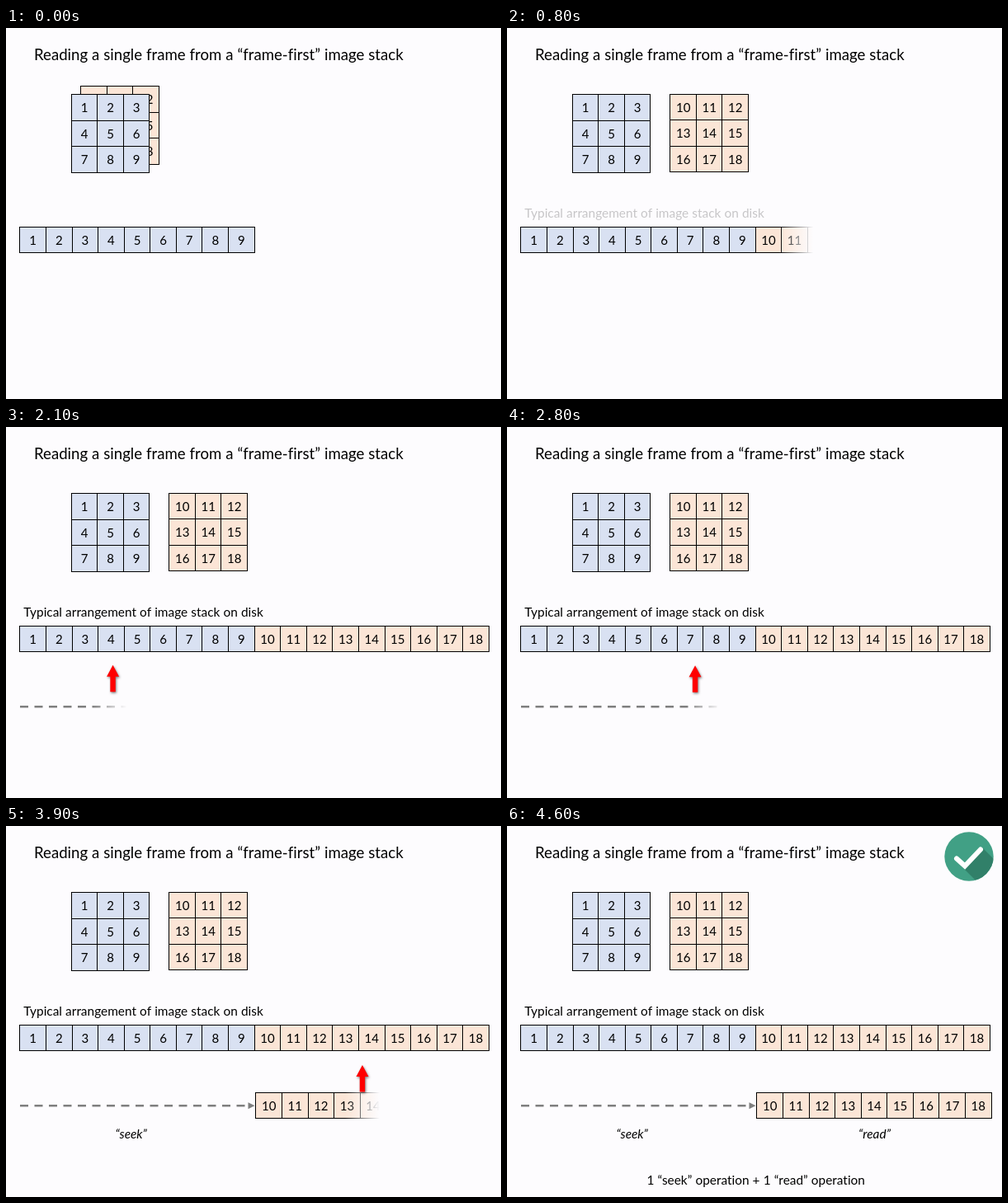
Recreate the animation shown at these times as an HTML page with a canvas. Size 600 by 450 pixels, loop 4.7 s.

```html
<!DOCTYPE html>
<html lang="en">
<head>
<meta charset="utf-8">
<title>Reading a frame from an image stack</title>
<style>
html, body { margin: 0; width: 100%; height: 100%; overflow: hidden; background: #fdfcfe; }
canvas { display: block; }
</style>
</head>
<body>
<canvas id="stage" width="600" height="450"></canvas>
<script>
const ctx = document.getElementById('stage').getContext('2d');
const LOOP = 4700, STEP = 100;
const BG = '#fdfcfe', CLEAR = 'rgba(253,252,254,0)';
const BLUE = '#d9e1f2', ORANGE = '#fbe5d6', GRAY = '#7f7f7f';
const CELL = 31.5, SLOT = 31.58, ROW = SLOT * 9, SOFT = 42;

const progress = (t, from, to) => Math.min(1, Math.max(0, (t - from) / (to - from)));
const snap = v => Math.floor(v) + 0.5;

function text(str, x, y, size, { align = 'left', style = '', alpha = 1 } = {}) {
  ctx.globalAlpha = alpha;
  ctx.font = `${style} ${size}px Lato, Carlito, sans-serif`;
  ctx.wordSpacing = size * 0.01 + 'px';
  ctx.letterSpacing = '0.01px'; // any spacing turns ligatures off
  ctx.textAlign = align;
  ctx.fillStyle = '#000';
  ctx.fillText(str, x, y);
  ctx.globalAlpha = 1;
}

function cells(x, y, cols, rows, w, first, color) {
  ctx.strokeStyle = '#000';
  ctx.lineWidth = 1;
  ctx.fillStyle = color;
  for (let i = 0; i < cols * rows; i++) {
    const cx = x + (i % cols) * w, cy = y + Math.floor(i / cols) * CELL;
    const left = snap(cx), top = snap(cy);
    const box = [left, top, snap(cx + w) - left, snap(cy + CELL) - top];
    ctx.fillStyle = color;
    ctx.fillRect(...box);
    ctx.strokeRect(...box);
    text(first + i, cx + w / 2, cy + CELL / 2 + 5.6, 15, { align: 'center' });
  }
}

// Hides the part of a row that a soft left-to-right wipe has not reached.
function wipe(x, y, h, p) {
  if (p >= 1) return;
  const lead = x + p * (ROW + SOFT);
  const fade = ctx.createLinearGradient(lead - SOFT, 0, lead, 0);
  fade.addColorStop(0, CLEAR);
  fade.addColorStop(1, BG);
  ctx.fillStyle = fade;
  ctx.fillRect(x - 2, y, ROW + 5, h);
}

function polygon(points, color) {
  ctx.beginPath();
  points.forEach(([x, y]) => ctx.lineTo(x, y));
  ctx.closePath();
  ctx.fillStyle = color;
  ctx.fill();
}

function pointer(x, y) {
  ctx.save();
  ctx.translate(x, y);
  ctx.shadowColor = 'rgba(0,0,0,.5)';
  ctx.shadowBlur = 3;
  ctx.shadowOffsetX = 1;
  ctx.shadowOffsetY = 1.5;
  polygon([[0, 0], [7.5, 14], [3.2, 14], [3.2, 32.5], [-3.2, 32.5], [-3.2, 14], [-7.5, 14]], '#f00');
  ctx.restore();
}

function seekLine(p) {
  ctx.strokeStyle = GRAY;
  ctx.lineWidth = 2.5;
  ctx.setLineDash([10, 7.5]);
  ctx.beginPath();
  ctx.moveTo(17, 339.3);
  ctx.lineTo(295, 339.3);
  ctx.stroke();
  ctx.setLineDash([]);
  polygon([[301.5, 339.3], [293.5, 335.3], [293.5, 343.3]], GRAY);
  wipe(17, 330, 18, p);
}

function badge(alpha) {
  ctx.save();
  ctx.globalAlpha = alpha;
  ctx.beginPath();
  ctx.arc(560, 37, 29.7, 0, Math.PI * 2);
  ctx.fillStyle = '#41a085';
  ctx.fill();
  ctx.clip();
  polygon([[543, 41], [555, 48], [576, 26], [626, 76], [605, 102], [593, 91]], '#318069');
  ctx.strokeStyle = '#fff';
  ctx.lineWidth = 6;
  ctx.lineCap = 'round';
  ctx.beginPath();
  ctx.moveTo(545, 39.5);
  ctx.lineTo(555, 48.5);
  ctx.lineTo(574, 28.5);
  ctx.stroke();
  ctx.restore();
}

function draw(t) {
  ctx.fillStyle = BG;
  ctx.fillRect(0, 0, 600, 450);
  text('Reading a single frame from a “frame-first” image stack', 34, 39.3, 18.6);

  const slide = progress(t, 0, 675);
  cells(90.9 + 107 * slide, 70.9 + 9.5 * slide, 3, 3, CELL, 10, ORANGE);
  cells(79.4, 80.9, 3, 3, CELL, 1, BLUE);

  const unfold = progress(t, 690, 1200);
  if (unfold > 0) {
    cells(16.9 + ROW, 241.4, 9, 1, SLOT, 10, ORANGE);
    wipe(16.9 + ROW, 239, 37, unfold);
    text('Typical arrangement of image stack on disk', 21.3, 230, 15.4, { alpha: unfold });
  }
  cells(16.9, 241.4, 9, 1, SLOT, 1, BLUE);

  const seek = progress(t, 1300, 3320), read = progress(t, 3440, 4440);
  if (seek > 0) seekLine(seek);
  if (read > 0) {
    cells(302.9, 323.4, 9, 1, SLOT, 10, ORANGE);
    wipe(302.9, 321, 37, read);
  }
  if (t >= 1200 && read < 1) pointer(17 + ROW * (seek + read), 288.3 + 1.3 * seek + read);

  const label = { align: 'center', style: 'italic' };
  if (t >= 3400) text('“seek”', 151.7, 379, 15.4, label);
  if (t >= 4500) {
    text('“read”', 445.5, 379, 15.4, label);
    text('1 “seek” operation + 1 “read” operation', 301.7, 434.7, 15.4, { align: 'center' });
  }
  badge(progress(t, 4400, 4600));
}

const start = performance.now();
function tick() {
  const t = (performance.now() - start) % LOOP;
  draw(Math.floor(t / STEP) * STEP);
  requestAnimationFrame(tick);
}
tick();
</script>
</body>
</html>
```
